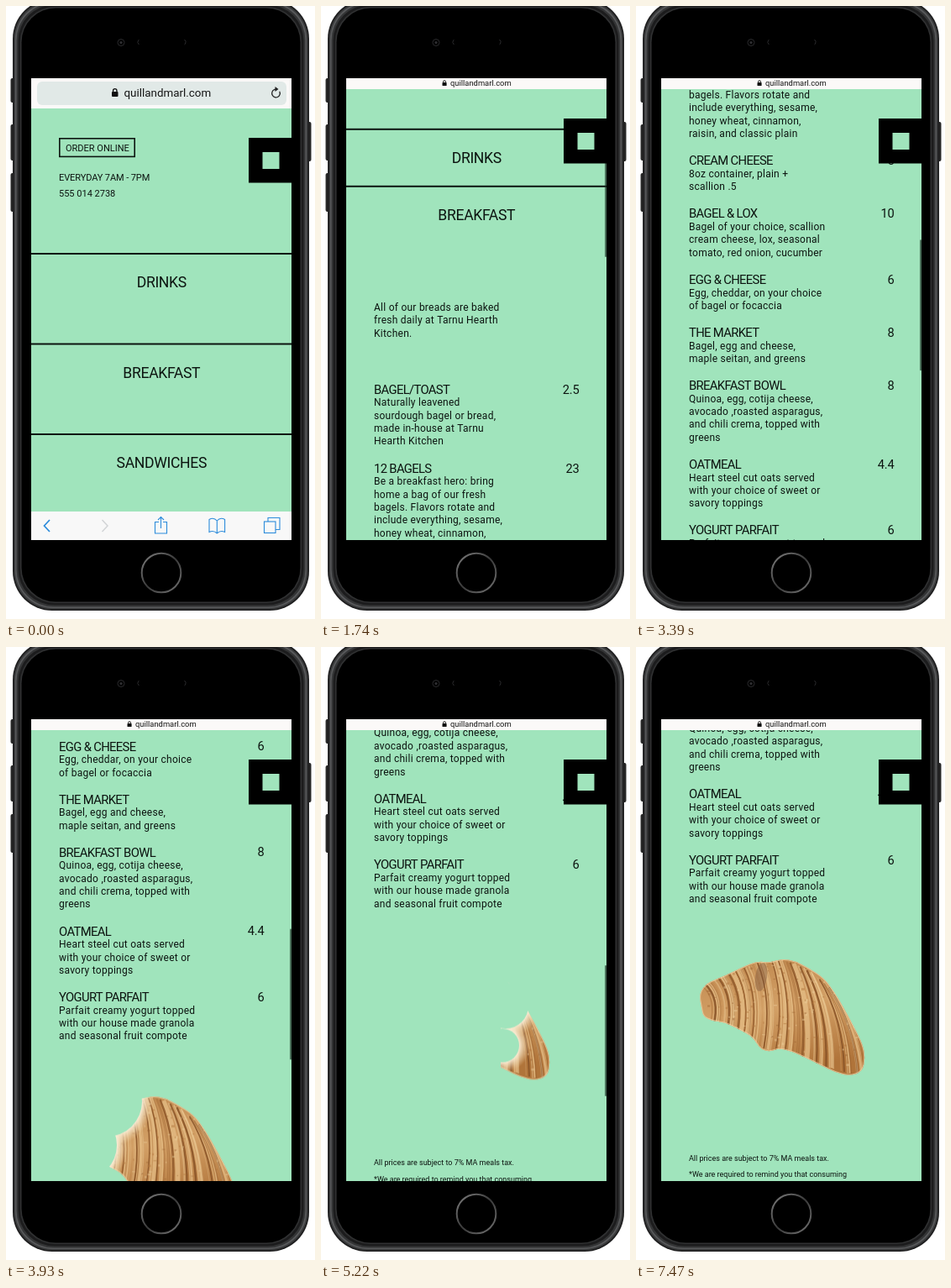
These frames come from a looping animation (368x730 px, 7.5 s). An HTML page with a canvas:

```html
<!DOCTYPE html>
<html lang="en">
<head>
<meta charset="utf-8">
<title>Menu on a phone</title>
<style>
html, body { margin: 0; width: 100%; height: 100%; overflow: hidden; background: #fff; }
canvas { display: block; width: 368px; height: 730px; }
</style>
</head>
<body>
<canvas id="stage"></canvas>
<script>
const W = 368, H = 730, LOOP = 7500;
const GREEN = '#a0e4bc', INK = '#0c1410', BLUE = '#2b8bdb';
const SCREEN = { x: 30, y: 86, w: 310, h: 550 };
const SANS = 'Roboto, "Liberation Sans", sans-serif';
const dpr = window.devicePixelRatio || 1;

function makeCanvas(el) {
  el.width = W * dpr;
  el.height = H * dpr;
  const c = el.getContext('2d');
  c.scale(dpr, dpr);
  return c;
}
const ctx = makeCanvas(document.getElementById('stage'));
const pastryLayer = document.createElement('canvas');
const pastry = makeCanvas(pastryLayer);

const lerp = (a, b, k) => a + (b - a) * k;
const clamp = (v, a = 0, b = 1) => Math.min(b, Math.max(a, v));
const ease = k => k * k * (3 - 2 * k);
const ramp = (t, a, b) => clamp((t - a) / (b - a));

function seeded(seed) {
  return () => (seed = (seed * 16807) % 2147483647) / 2147483647;
}

// Page scroll over time: [ms, px]
const SCROLL = [[780, 0], [1250, 58], [1740, 148], [2580, 373.5], [3390, 639],
  [3930, 846.5], [4500, 984], [5220, 1004.5], [5560, 1010]];

// Monotone cubic through the keys
function track(keys, t) {
  const n = keys.length - 1;
  if (t <= keys[0][0]) return keys[0][1];
  if (t >= keys[n][0]) return keys[n][1];
  const rate = i => (keys[i + 1][1] - keys[i][1]) / (keys[i + 1][0] - keys[i][0]);
  const slope = i => {
    if (i === 0 || i === n) return 0;
    const a = rate(i - 1), b = rate(i);
    return a * b <= 0 ? 0 : 2 * a * b / (a + b);
  };
  let i = 0;
  while (t > keys[i + 1][0]) i++;
  const d = keys[i + 1][0] - keys[i][0], u = (t - keys[i][0]) / d;
  const u2 = u * u, u3 = u2 * u;
  return (2 * u3 - 3 * u2 + 1) * keys[i][1] + (u3 - 2 * u2 + u) * d * slope(i) +
    (3 * u2 - 2 * u3) * keys[i + 1][1] + (u3 - u2) * d * slope(i + 1);
}

const INTRO = ['All of our breads are baked', 'fresh daily at Tarnu Hearth', 'Kitchen.'];
const ITEMS = [
  ['BAGEL/TOAST', '2.5', 'Naturally leavened|sourdough bagel or bread,|made in-house at Tarnu|Hearth Kitchen'],
  ['12 BAGELS', '23', 'Be a breakfast hero: bring|home a bag of our fresh|bagels. Flavors rotate and|include everything, sesame,|honey wheat, cinnamon,|raisin, and classic plain'],
  ['CREAM CHEESE', '5', '8oz container, plain +|scallion .5'],
  ['BAGEL & LOX', '10', 'Bagel of your choice, scallion|cream cheese, lox, seasonal|tomato, red onion, cucumber'],
  ['EGG & CHEESE', '6', 'Egg, cheddar, on your choice|of bagel or focaccia'],
  ['THE MARKET', '8', 'Bagel, egg and cheese,|maple seitan, and greens'],
  ['BREAKFAST BOWL', '8', 'Quinoa, egg, cotija cheese,|avocado ,roasted asparagus,|and chili crema, topped with|greens'],
  ['OATMEAL', '4.4', 'Heart steel cut oats served|with your choice of sweet or|savory toppings'],
  ['YOGURT PARFAIT', '6', 'Parfait creamy yogurt topped|with our house made granola|and seasonal fruit compote']
];
const FOOTER = ['All prices are subject to 7% MA meals tax.',
  '*We are required to remind you that consuming'];

// y is the middle of the capitals
function text(s, x, y, size, gap = 0, align = 'left', color = INK) {
  ctx.font = `${size}px ${SANS}`;
  ctx.letterSpacing = gap + 'px';
  ctx.textAlign = align;
  ctx.fillStyle = color;
  ctx.fillText(s, x, y + size * 0.36);
}

function rect(x, y, w, h, color) {
  ctx.fillStyle = color;
  ctx.fillRect(x, y, w, h);
}

function round(x, y, w, h, r, color) {
  ctx.beginPath();
  ctx.roundRect(x, y, w, h, r);
  ctx.fillStyle = color;
  ctx.fill();
}

function line(color, width, ...pts) {
  ctx.beginPath();
  pts.forEach(([x, y], i) => i ? ctx.lineTo(x, y) : ctx.moveTo(x, y));
  ctx.strokeStyle = color;
  ctx.lineWidth = width;
  ctx.stroke();
}

function drawPhone() {
  rect(0, 0, W, H, '#fff');
  for (const [y, h] of [[86, 29], [141, 43], [199, 46]]) round(5.5, y, 5, h, 2, '#262626');
  round(358, 138, 5.5, 47, 2, '#262626');
  // nested rims: [inset, colour]
  const rims = [[0, '#1d1d1e'], [1.5, '#3a3b3c'], [3, '#58595b'], [4.5, '#343536'],
    [6.5, '#1c1c1d'], [9, '#303132'], [10.5, '#000']];
  for (const [d, color] of rims) round(8 + d, d - 8, 353 - 2 * d, 728 - 2 * d, 47 - d * 0.6, color);

  ctx.lineWidth = 1;
  ctx.strokeStyle = '#2b2b2d';
  ctx.beginPath();
  ctx.arc(137, 43.5, 4, 0, 7);
  ctx.stroke();
  ctx.beginPath();
  ctx.arc(161, 43, 4, 2.3, 4);
  ctx.stroke();
  ctx.beginPath();
  ctx.arc(210, 43, 4, -0.9, 0.9);
  ctx.stroke();
  round(135.5, 42, 3, 3, 1.5, '#303033');

  const ring = ctx.createLinearGradient(165, 655, 205, 695);
  ring.addColorStop(0, '#777');
  ring.addColorStop(0.5, '#3a3a3a');
  ring.addColorStop(1, '#6c6c6c');
  ctx.strokeStyle = ring;
  ctx.lineWidth = 2;
  ctx.beginPath();
  ctx.arc(185, 675, 23.3, 0, 7);
  ctx.stroke();
}

// Croissant outline, clockwise from the left tip
const OUTLINE = [[78, 430], [75, 413], [84, 400], [105, 392], [127, 381], [144, 374],
  [160, 376], [174, 371], [190, 374], [205, 382], [224, 394], [237, 412], [248, 431],
  [260, 453], [270, 473], [273, 489], [270, 505], [256, 511], [238, 507], [220, 498],
  [202, 489], [184, 481], [170, 478], [160, 482], [148, 479], [139, 464], [122, 455],
  [106, 447], [90, 445], [80, 440]];

function outlinePath(c) {
  const n = OUTLINE.length;
  const mid = i => {
    const a = OUTLINE[i % n], b = OUTLINE[(i + 1) % n];
    return [(a[0] + b[0]) / 2, (a[1] + b[1]) / 2];
  };
  c.beginPath();
  c.moveTo(...mid(0));
  for (let i = 1; i <= n; i++) c.quadraticCurveTo(...OUTLINE[i % n], ...mid(i));
  c.closePath();
}

// A crease across the dough: u runs from the left tip (-1) to the right tip (1)
function crease(u, color, width) {
  const r = Math.abs(u);
  const x1 = u < 0 ? 155 - 82 * r : 160 + 78 * r;
  const y1 = u < 0 ? 372 + 32 * r : 372 + 42 * r * r;
  const x2 = u < 0 ? 162 - 78 * r : 164 + 112 * r;
  const y2 = u < 0 ? 482 - 34 * r : 482 + 32 * r;
  pastry.beginPath();
  pastry.moveTo(x1, y1);
  pastry.quadraticCurveTo((x1 + x2) / 2 + 14, (y1 + y2) / 2 - 8, x2, y2);
  pastry.strokeStyle = color;
  pastry.lineWidth = width;
  pastry.stroke();
}

const BITES = 6;
function biteCircles(k) {
  const s = k / (BITES - 1);
  return [
    [lerp(120, 220, s), lerp(378, 422, s), lerp(42, 27, s)],
    [lerp(90, 216, s), lerp(430, 469, s), lerp(42, 20, s)]
  ];
}

function drawDough(c) {
  const rand = seeded(41);
  outlinePath(c);
  c.clip();
  const g = c.createLinearGradient(150, 370, 175, 505);
  g.addColorStop(0, '#c18a50');
  g.addColorStop(0.45, '#d3a066');
  g.addColorStop(1, '#b0743a');
  c.fillStyle = g;
  c.fillRect(60, 360, 230, 160);
  for (let i = -6; i <= 7; i++) {
    const u = i / 7 + (rand() - 0.5) * 0.08;
    crease(u + 0.05, 'rgba(228,188,132,.8)', 4 + rand() * 3);
    crease(u, 'rgba(135,82,38,.85)', 1.2 + rand() * 1.5);
  }
  const tones = ['rgba(150,92,44,.4)', 'rgba(236,205,154,.45)', 'rgba(180,120,62,.5)'];
  for (let i = 0; i < 60; i++) crease(rand() * 2 - 1, tones[i % 3], 0.6 + rand());
  for (let i = 0; i < 220; i++) {
    c.fillStyle = tones[i % 3];
    c.fillRect(75 + rand() * 198, 372 + rand() * 138, 1 + rand() * 3, 1 + rand() * 2);
  }
  c.fillStyle = 'rgba(126,88,60,.45)';
  c.beginPath();
  c.ellipse(149, 393, 7, 17, 0.15, 0, 7);
  c.fill();
  outlinePath(c);
  c.strokeStyle = 'rgba(240,214,172,.7)';
  c.lineWidth = 2;
  c.stroke();
}

let baked = -1;
function bakePastry(bites) {
  if (bites === baked) return;
  baked = bites;
  const c = pastry;
  c.clearRect(0, 0, W, H);
  c.save();
  drawDough(c);
  c.restore();
  if (!bites) return;

  // pale crumb along the newest bite, then the bites themselves
  c.save();
  c.globalCompositeOperation = 'source-atop';
  for (const [x, y, r] of biteCircles(bites - 1)) {
    const crumb = c.createRadialGradient(x, y, r, x, y, r + 13);
    crumb.addColorStop(0, 'rgba(250,238,216,.95)');
    crumb.addColorStop(1, 'rgba(240,214,170,0)');
    c.fillStyle = crumb;
    c.beginPath();
    c.arc(x, y, r + 13, 0, 7);
    c.fill();
  }
  c.globalCompositeOperation = 'destination-out';
  c.fillStyle = '#000';
  for (let k = 0; k < bites; k++) {
    const circles = biteCircles(k);
    c.fillRect(0, 360, circles[1][0] - 2, 160);
    for (const [x, y, r] of circles) {
      c.beginPath();
      c.arc(x, y, r, 0, 7);
      c.fill();
    }
  }
  c.restore();
}

function drawPastry(t, dy) {
  const phase = t < 3530 ? 0 : (t - 3530) % 1850;
  if (phase >= 1730) return;
  const bites = phase < 300 ? 0 : Math.min(BITES, 1 + Math.floor((phase - 300) / 230));
  bakePastry(bites);
  ctx.drawImage(pastryLayer, 0, dy, W, H);
}

function drawSection(name, y) {
  rect(SCREEN.x, y - 1, SCREEN.w, 2, INK);
  text(name, 185.3, y + 34, 17.6, -0.35, 'center');
}

function drawMenu(t, top) {
  INTRO.forEach((s, i) => text(s, 63, top - 98 + i * 15.5, 12, 0.25));
  let y = top;
  ITEMS.forEach(([name, price, note], i) => {
    const rows = note.split('|');
    text(name, 63, y, 14.8, -0.65);
    text(price, 307.5, y, 14.6, -0.2, 'right');
    rows.forEach((s, k) => text(s, 63, y + 15.6 + k * 15.4, 12, 0.25));
    if (i < ITEMS.length - 1) y += rows.length * 15.5 + 32;
  });
  if (y < 560) drawPastry(t, y - 253.5);
  FOOTER.forEach((s, i) => text(s, 63, y + 355 + i * 19.3, 9));
}

function drawPage(t, scroll) {
  const open = ease(ramp(t, 90, 760));
  const y1 = 295 - scroll;
  const y2 = y1 + lerp(107.5, 68, open);
  const y3 = y2 + lerp(107.5, 1500, open);

  rect(SCREEN.x, SCREEN.y, SCREEN.w, SCREEN.h, GREEN);
  if (y1 > 80) {
    ctx.strokeStyle = INK;
    ctx.lineWidth = 1.6;
    ctx.strokeRect(63.8, y1 - 137.2, 89.4, 21.6);
    text('ORDER ONLINE', 71, y1 - 125.5, 11);
    text('EVERYDAY 7AM - 7PM', 63, y1 - 90.5, 11, -0.1);
    text('555 014 2738', 63, y1 - 72, 11);
  }
  drawSection('DRINKS', y1);
  if (open > 0) drawMenu(t, y2 + 241.5);
  drawSection('BREAKFAST', y2);
  if (y3 < 640) {
    rect(SCREEN.x, y3, SCREEN.w, 700, GREEN);
    drawSection('SANDWICHES', y3);
  }
}

function drawLock(x, y, k) {
  round(x, y - 1.5 * k, 7.5 * k, 6 * k, k, '#111');
  ctx.strokeStyle = '#111';
  ctx.lineWidth = 1.3 * k;
  ctx.beginPath();
  ctx.arc(x + 3.75 * k, y - 2.6 * k, 2.2 * k, Math.PI, 0);
  ctx.lineTo(x + 5.95 * k, y - k);
  ctx.moveTo(x + 1.55 * k, y - 2.6 * k);
  ctx.lineTo(x + 1.55 * k, y - k);
  ctx.stroke();
}

function drawAddress(k) {
  const h = lerp(36, 13, k);
  rect(SCREEN.x, SCREEN.y, SCREEN.w, h, '#fbf9f8');
  ctx.globalAlpha = clamp(1 - k * 1.6);
  round(37, lerp(90, 87, k), 297, lerp(28, 10, k), 6, '#e1e9e7');
  const y = lerp(103.5, 92, k);
  ctx.strokeStyle = '#222';
  ctx.lineWidth = 1.3;
  ctx.beginPath();
  ctx.arc(321.5, y + 0.5, 4.8, -0.5, 4.6);
  ctx.stroke();
  ctx.beginPath();
  ctx.moveTo(320.5, y - 7.5);
  ctx.lineTo(324.5, y - 4.4);
  ctx.lineTo(320.5, y - 1.6);
  ctx.fillStyle = '#222';
  ctx.fill();
  ctx.globalAlpha = 1;
  drawLock(lerp(126, 144.5, k), y, lerp(1, 0.68, k));
  text('quillandmarl.com', lerp(140.5, 154, k), y, lerp(13.4, 9.4, k), 0, 'left', '#151515');
}

function drawToolbar(k) {
  if (k >= 1) return;
  ctx.save();
  ctx.translate(0, k * 34);
  rect(SCREEN.x, 602, SCREEN.w, 34, '#f8f8f8');
  line(BLUE, 1.7, [52, 612], [45.5, 619], [52, 626]);
  line('#d2d4d6', 1.5, [114.5, 612], [121, 619], [114.5, 626]);
  const w = 1.1;
  line(BLUE, w, [182, 614.5], [177.5, 614.5], [177.5, 628], [191.5, 628], [191.5, 614.5], [187, 614.5]);
  line(BLUE, w, [184.5, 622], [184.5, 608.5]);
  line(BLUE, w, [181, 612], [184.5, 608.5], [188, 612]);
  ctx.beginPath();
  for (const s of [-1, 1]) {
    ctx.moveTo(251.3, 613);
    ctx.quadraticCurveTo(251.3 + s * 4, 608.5, 251.3 + s * 9.3, 611.5);
    ctx.lineTo(251.3 + s * 9.3, 626.5);
    ctx.quadraticCurveTo(251.3 + s * 4, 624, 251.3, 628);
  }
  ctx.moveTo(251.3, 613);
  ctx.lineTo(251.3, 628);
  ctx.stroke();
  ctx.strokeRect(307.5, 614, 13.5, 13.5);
  line(BLUE, w, [312, 614], [312, 609.5], [326, 609.5], [326, 623.5], [321, 623.5]);
  ctx.restore();
}

function drawScrollbar(t, scroll, k) {
  const alpha = ramp(t, 780, 900) * (1 - ramp(t, 5750, 6100));
  if (!alpha) return;
  const y = 143 + (scroll - 148) * 0.2755 + (1 - k) * 23;
  round(338, y, 2, 156, 1, `rgba(20,40,30,${0.6 * alpha})`);
}

function draw(t) {
  const scroll = track(SCROLL, t);
  const k = ease(clamp(scroll / 60));
  drawPhone();
  ctx.save();
  ctx.beginPath();
  ctx.rect(SCREEN.x, SCREEN.y, SCREEN.w, SCREEN.h);
  ctx.clip();
  drawPage(t, scroll);
  drawScrollbar(t, scroll, k);
  const y = lerp(157, 134, k);
  rect(289, y, 51, 53.5, '#000');
  rect(305.5, y + 17, 20, 20, GREEN);
  drawAddress(k);
  drawToolbar(k);
  ctx.restore();
}

const start = performance.now();
function tick() {
  draw((performance.now() - start) % LOOP);
  requestAnimationFrame(tick);
}
tick();
</script>
</body>
</html>
```
